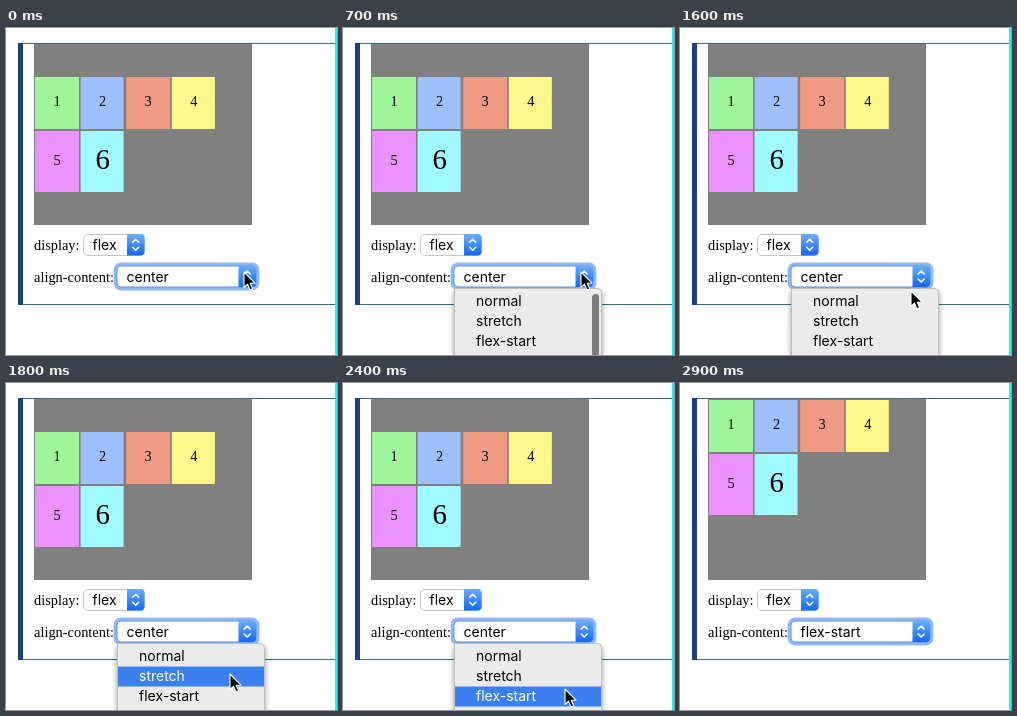
An HTML page that plays this animation: 331x327 px, repeating every 3 s.

```html
<!DOCTYPE html>
<html lang="en">
<head>
<meta charset="utf-8">
<title>align-content demo</title>
<style>
  html, body { margin: 0; width: 100%; height: 100%; overflow: hidden; background: #fff; }
  svg { display: block; }
  text { font: 14px Inter, "Open Sans", sans-serif; fill: #000; }
  .serif { font: 14.4px "Liberation Serif", Times, serif; }
  .digit { text-anchor: middle; }
  .big { font-size: 28.8px; }
</style>
</head>
<body>
<svg width="331" height="327" viewBox="0 0 331 327">
  <defs>
    <linearGradient id="blue" x2="0" y2="1">
      <stop offset="0" stop-color="#68adf8"/>
      <stop offset="1" stop-color="#1469f3"/>
    </linearGradient>
    <filter id="soft" x="-20%" y="-20%" width="140%" height="140%">
      <feGaussianBlur stdDeviation="2.5"/>
    </filter>
    <g id="chevrons" fill="none" stroke="#fff" stroke-width="1.6" stroke-linecap="round" stroke-linejoin="round">
      <path d="M-3 -2.5 L0 -5.5 L3 -2.5 M-3 2.5 L0 5.5 L3 2.5"/>
    </g>
  </defs>

  <path d="M12 15.5H329M12 276.5H329" stroke="#356f83"/>
  <rect x="12" y="15" width="5" height="262" fill="#1b4080"/>
  <rect x="329" width="2" height="327" fill="#16f5fa"/>

  <rect x="28" y="16" width="218" height="181" fill="#808080"/>
  <g id="items"></g>

  <text class="serif" x="28" y="222">display:</text>
  <text class="serif" x="28" y="254">align-content:</text>

  <rect x="77.5" y="206.5" width="61" height="21" rx="4.5" fill="#fff" stroke="#c6c6c6"/>
  <path d="M121 206H134.5a4 4 0 0 1 4 4V223.500a4 4 0 0 1-4 4H121Z" fill="url(#blue)"/>
  <use href="#chevrons" x="129.700" y="216.800"/>
  <text x="86.500" y="222">flex</text>

  <rect x="109.300" y="236.300" width="142.400" height="24.400" rx="5.500" fill="#fff" stroke="#8fb8f1" stroke-width="3.400"/>
  <rect x="111" y="238" width="139" height="21" rx="4" fill="#fff" stroke="#5b93e6"/>
  <path d="M232.500 238H246a4 4 0 0 1 4 4V255a4 4 0 0 1-4 4H232.500Z" fill="url(#blue)"/>
  <use href="#chevrons" x="241.200" y="248.500"/>
  <text id="value" x="120.500" y="254"></text>

  <g id="menu">
    <rect x="110" y="264" width="150" height="80" fill="#000" opacity=".3" filter="url(#soft)"/>
    <path d="M111.500 335V260.500H254.500a4 4 0 0 1 4 4V335Z" fill="#ebebeb" stroke="#bdbdbd"/>
    <rect id="band" x="112" width="146" height="20" fill="#3b80ef"/>
    <g id="options"></g>
    <rect id="thumb" x="249" y="266" width="7" height="80" rx="3.500" fill="#7d7d7d"/>
  </g>

  <path id="cursor" d="M0 0V15.500L3.500 12.200L6 18L8.700 16.800L6.200 11.200H11Z" fill="#000" stroke="#fff" stroke-width="1.100" stroke-linejoin="round"/>
</svg>

<script>
const LOOP = 3000, STEP = 100;
const OPEN = 700, CLOSE = 2600, HIDE = 2900;
const NAMES = ["normal", "stretch", "flex-start"];
const COLORS = ["#9ff59a", "#9dc0fa", "#ef9a83", "#fff98d", "#eb92fa", "#a0fbff"];

// time, x, y of the pointer tip
const PATH = [
  [0, 238, 244], [1400, 238, 244], [1500, 235, 253], [1600, 231, 263],
  [1700, 228, 277], [1800, 224, 291], [1900, 223, 298], [2000, 222, 304],
  [2100, 222, 306], [LOOP, 222, 306]
];

const $ = id => document.getElementById(id);

function add(parent, tag, attrs, label = "") {
  const el = document.createElementNS("http://www.w3.org/2000/svg", tag);
  for (const key in attrs) el.setAttribute(key, attrs[key]);
  el.textContent = label;
  parent.append(el);
  return el;
}

COLORS.forEach((fill, i) => {
  const col = i % 4, row = i < 4 ? 0 : 1;
  const x = 29 + col * 45.6, width = col % 2 ? 43 : 44;
  add($("items"), "rect", { x, y: row ? 103 : 49, width, height: row ? 61 : 52, fill });
  add($("items"), "text", {
    class: "serif digit" + (i === 5 ? " big" : ""),
    x: x + 22, y: i === 5 ? 140.5 : row ? 137 : 78
  }, i + 1);
});

const options = NAMES.map((name, i) =>
  add($("options"), "text", { x: 133, y: 278 + i * 20 }, name));

function pointer(t) {
  const i = PATH.findIndex((p, k) => k > 0 && t <= p[0]);
  const a = PATH[i - 1], b = PATH[i], u = (t - a[0]) / (b[0] - a[0]);
  return [a[1] + (b[1] - a[1]) * u, a[2] + (b[2] - a[2]) * u];
}

function hovered(t, y) {
  const blink = t >= 2300 && t < 2400;
  return blink || y < 264 ? -1 : Math.floor((y - 264) / 20);
}

function draw(t) {
  const [x, y] = pointer(t);
  const done = t >= CLOSE, hot = hovered(t, y);

  $("items").setAttribute("transform", `translate(0 ${done ? -32 : 0})`);
  $("value").textContent = done ? "flex-start" : "center";

  $("menu").style.display = t >= OPEN && !done ? "" : "none";
  $("menu").style.opacity = t >= 2500 ? 0.5 : 1;
  $("thumb").style.opacity = Math.max(0, Math.min(1, (1500 - t) / 400));
  $("band").style.display = hot < 0 ? "none" : "";
  $("band").setAttribute("y", 263.5 + hot * 20);
  options.forEach((el, i) => el.style.fill = i === hot ? "#fff" : "#000");

  $("cursor").style.display = t >= HIDE ? "none" : "";
  $("cursor").setAttribute("transform", `translate(${x} ${y})`);
}

const start = performance.now();
function tick() {
  const t = (performance.now() - start) % LOOP;
  draw(Math.floor(t / STEP) * STEP);
  requestAnimationFrame(tick);
}
tick();
</script>
</body>
</html>
```
